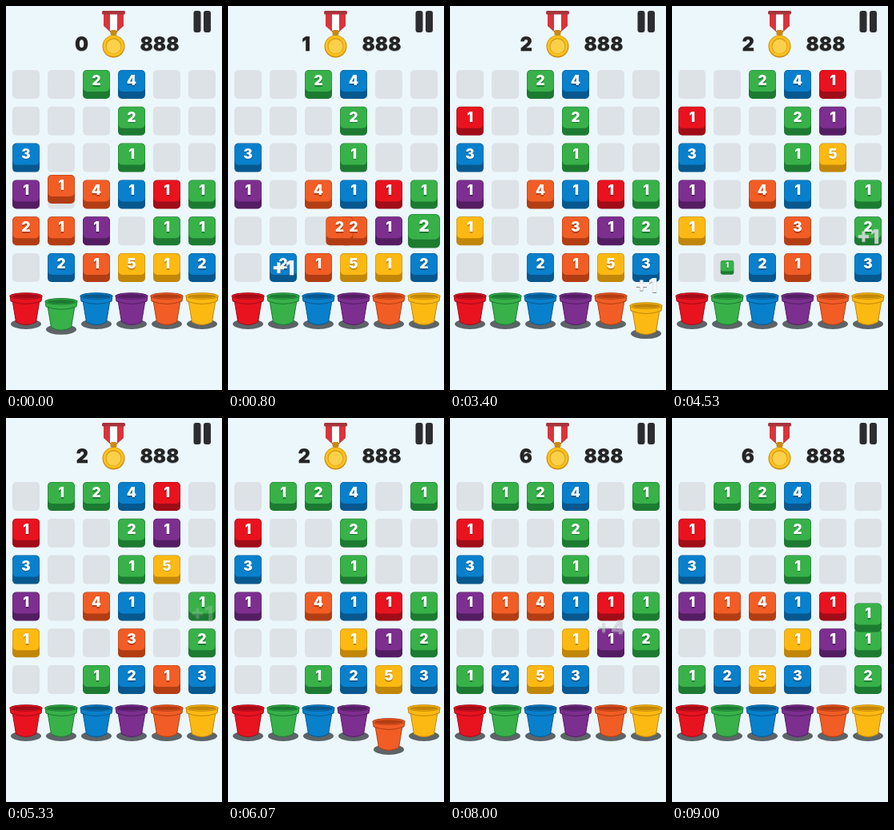
These frames come from a looping animation (270 px wide and 480 px high, 9.07 s). An HTML page with a canvas:

```html
<!DOCTYPE html>
<html lang="en">
<head>
<meta charset="utf-8">
<title>Block and bucket puzzle</title>
<style>
  html, body { margin: 0; width: 100%; height: 100%; overflow: hidden; background: #ecf7fc; }
  canvas { display: block; width: 270px; height: 480px; }
</style>
</head>
<body>
<canvas id="stage"></canvas>
<script>
const LOOP = 9070;
const SPEED = 0.65;      // px per ms
const BUCKET_Y = 380;
const POP = 220, SPAWN = 160, DIP = 540;
const FONT = 'Inter, "Open Sans", sans-serif';
const COLORS = {
  R: ['#e8131f', '#a00c18'], G: ['#38b149', '#1c7b31'], B: ['#0880cc', '#06588f'],
  P: ['#7c2f8f', '#541d63'], O: ['#f15d25', '#b33d13'], Y: ['#fcb912', '#c28708']
};
const BUCKETS = 'RGBPOY';
const BOARD = [
  '-- -- G2 B4 -- --',
  '-- O1 -- G2 -- --',
  'B3 -- -- G1 -- --',
  'P1 O1 O4 B1 R1 G1',
  'O2 B2 P1 -- G1 G1',
  '-- G1 O1 Y5 Y1 B2'
];

const colX = c => 25 + 44 * c;
const rowY = r => 98 + 45.8 * r;
const clamp01 = v => Math.max(0, Math.min(1, v));

const tiles = [];
const catches = [];

function addTile(code, col, row, born = -1e4) {
  const value = +code[1];
  tiles.push({ color: code[0], value, col, row, born, gone: Infinity,
    x: colX(col), y: rowY(row), moves: [], grades: [{ t: -1e4, value }] });
}

function send(tile, t, x, y) {
  const end = t + Math.hypot(x - tile.x, y - tile.y) / SPEED;
  if (end > t) tile.moves.push({ t, end, x0: tile.x, y0: tile.y, x1: x, y1: y });
  tile.x = x;
  tile.y = y;
  return end;
}

function collect(tile, t, line) {
  tile.gone = send(tile, t, tile.x, BUCKET_Y);
  const open = catches.find(c => c.col === line && tile.gone - c.t < 500);
  if (open) open.points += tile.value;
  else catches.push({ col: line, t: tile.gone, points: tile.value });
}

function swipe(t, line, dir) {
  const vertical = dir === 'up' || dir === 'down';
  const forward = dir === 'down' || dir === 'right';
  const along = vertical ? 'row' : 'col', across = vertical ? 'col' : 'row';
  const step = forward ? -1 : 1;
  let slot = forward ? 5 : 0, last = null;
  tiles.filter(k => k.gone === Infinity && k[across] === line)
    .sort((a, b) => step * (a[along] - b[along]))
    .forEach(tile => {
      if (dir === 'down' && slot === 5 && tile.color === BUCKETS[line]) {
        collect(tile, t, line);
      } else if (last && last.color === tile.color && last.value === tile.value) {
        tile.gone = send(tile, t, last.x, last.y);
        last.grades.push({ t: tile.gone, value: ++last.value });
        last = null;
      } else {
        tile[along] = slot;
        send(tile, t, colX(tile.col), rowY(tile.row));
        slot += step;
        last = tile;
      }
    });
}

BOARD.forEach((line, row) => line.split(' ').forEach((code, col) => {
  if (code !== '--') addTile(code, col, row);
}));
swipe(-130, 1, 'down');
swipe(625, 4, 'right');
addTile('R1', 0, 1, 850);
swipe(1450, 5, 'up');
addTile('Y1', 0, 4, 1670);
swipe(2250, 5, 'right');
addTile('B2', 5, 4, 2330);
swipe(2870, 5, 'down');
swipe(4230, 4, 'up');
addTile('G1', 1, 5, 4453);
swipe(4900, 5, 'right');
addTile('G1', 1, 0, 4990);
swipe(5450, 4, 'right');
addTile('G1', 5, 0, 5660);
swipe(5855, 4, 'down');
swipe(7000, 5, 'left');
addTile('O1', 1, 3, 7150);
swipe(8768, 5, 'down');

const canvas = document.getElementById('stage');
const ctx = canvas.getContext('2d');
const ratio = window.devicePixelRatio || 1;
canvas.width = 270 * ratio;
canvas.height = 480 * ratio;

function box(x, y, w, h, r, fill) {
  ctx.beginPath();
  ctx.roundRect(x, y, w, h, r);
  ctx.fillStyle = fill;
  ctx.fill();
}

function oval(x, y, rx, ry, fill) {
  ctx.beginPath();
  ctx.ellipse(x, y, rx, ry, 0, 0, 7);
  ctx.fillStyle = fill;
  ctx.fill();
}

function shape(points, fill) {
  ctx.beginPath();
  points.forEach(([x, y]) => ctx.lineTo(x, y));
  ctx.closePath();
  ctx.fillStyle = fill;
  ctx.fill();
}

function label(text, x, y, size, fill, shade, align = 'center') {
  ctx.font = `900 ${size}px ${FONT}`;
  ctx.textAlign = align;
  ctx.fillStyle = shade;
  ctx.fillText(text, x, y + 1.5);
  ctx.fillStyle = fill;
  ctx.fillText(text, x, y);
}

function pose(tile, t) {
  const first = tile.moves[0];
  let x = first ? first.x0 : tile.x, y = first ? first.y0 : tile.y, moving = false;
  for (const m of tile.moves) {
    if (t < m.t) break;
    const p = clamp01((t - m.t) / (m.end - m.t));
    x = m.x0 + (m.x1 - m.x0) * p;
    y = m.y0 + (m.y1 - m.y0) * p;
    moving = p < 1;
  }
  const grade = tile.grades.filter(g => g.t <= t).pop();
  const scale = clamp01((t - tile.born) / SPAWN) *
    (1 + 0.18 * Math.sin(Math.PI * clamp01((t - grade.t) / POP)));
  return { x, y, moving, scale, value: grade.value, color: tile.color };
}

function placed(p, draw) {
  ctx.save();
  ctx.translate(p.x, p.y);
  ctx.scale(p.scale, p.scale);
  draw(...COLORS[p.color]);
  ctx.restore();
}

function drawTiles(t) {
  const poses = tiles.filter(k => t >= k.born && t < k.gone)
    .map(k => pose(k, t)).sort((a, b) => a.moving - b.moving);
  poses.forEach(p => placed(p, (face, side) => {
    box(-17, -18, 34, 36, 5, side);
    box(-16.5, -17.5, 33, 26.5, 5, face);
  }));
  poses.forEach(p => placed(p, (face, side) => label(p.value, 0, 1, 17, '#fff', side)));
}

function drawBucket(col, dip) {
  const [face, side] = COLORS[BUCKETS[col]];
  ctx.save();
  ctx.translate(colX(col), dip);
  oval(0, 397.5, 19, 6.5, '#5d6468');
  ctx.beginPath();
  ctx.moveTo(-17, 368);
  ctx.lineTo(-12.5, 395);
  ctx.quadraticCurveTo(0, 402, 12.5, 395);
  ctx.lineTo(17, 368);
  ctx.closePath();
  ctx.fillStyle = face;
  ctx.fill();
  ctx.strokeStyle = side;
  ctx.lineWidth = 1;
  ctx.stroke();
  ctx.beginPath();
  ctx.moveTo(-20, 362);
  ctx.lineTo(-19, 369);
  ctx.quadraticCurveTo(0, 376, 19, 369);
  ctx.lineTo(20, 362);
  ctx.closePath();
  ctx.fillStyle = face;
  ctx.fill();
  ctx.stroke();
  oval(0, 362.5, 20, 3.8, face);
  ctx.stroke();
  oval(0, 362.8, 17.5, 2.5, side);
  ctx.restore();
}

function drawHeader(score) {
  shape([[122, 9], [147, 9], [147, 25], [138, 33], [131, 33], [122, 25]], '#d9343c');
  shape([[130, 9], [139, 9], [139, 31], [130, 31]], '#fff');
  box(120, 6, 29, 4.5, 1.5, '#a8343b');
  box(130.5, 30, 8, 7, 2, '#c98a10');
  oval(134.5, 50.5, 14, 14, '#c98a10');
  oval(134.5, 50, 13, 13, '#fcc21c');
  oval(134.5, 50, 10, 10, '#dd9c10');
  oval(134.5, 50.5, 9, 9, '#fbd04a');
  label(score, 103, 55.5, 24, '#242424', '#a9b0b5', 'right');
  label('888', 192, 55.5, 24, '#242424', '#a9b0b5');
  box(234.5, 6, 9, 27, 3, '#2b2d30');
  box(247, 6, 9, 27, 3, '#2b2d30');
}

function drawFloat(c, t) {
  const age = t - c.t - 49;
  if (age < 400 || age > 2600) return;
  ctx.globalAlpha = clamp01((2600 - age) / 1600);
  label('+' + c.points, colX(c.col), 336 - 0.054 * (age - 800), 25, '#f4f5f6', '#7f868a');
  ctx.globalAlpha = 1;
}

function draw() {
  const t = performance.now() % LOOP;
  ctx.setTransform(ratio, 0, 0, ratio, 0, 0);
  ctx.fillStyle = '#ecf7fc';
  ctx.fillRect(0, 0, 270, 480);
  for (let i = 0; i < 36; i++) {
    box(colX(i % 6) - 17, rowY(Math.floor(i / 6)) - 18, 34, 36, 5, '#dde2e7');
  }
  drawTiles(t);
  for (let col = 0; col < 6; col++) {
    const hit = catches.find(c => c.col === col);
    drawBucket(col, hit ? 24 * Math.sin(Math.PI * clamp01((t - hit.t) / DIP)) : 0);
  }
  drawHeader(catches.reduce((sum, c) => sum + (t >= c.t + 449 ? c.points : 0), 0));
  catches.forEach(c => drawFloat(c, t));
  requestAnimationFrame(draw);
}
draw();
</script>
</body>
</html>
```
